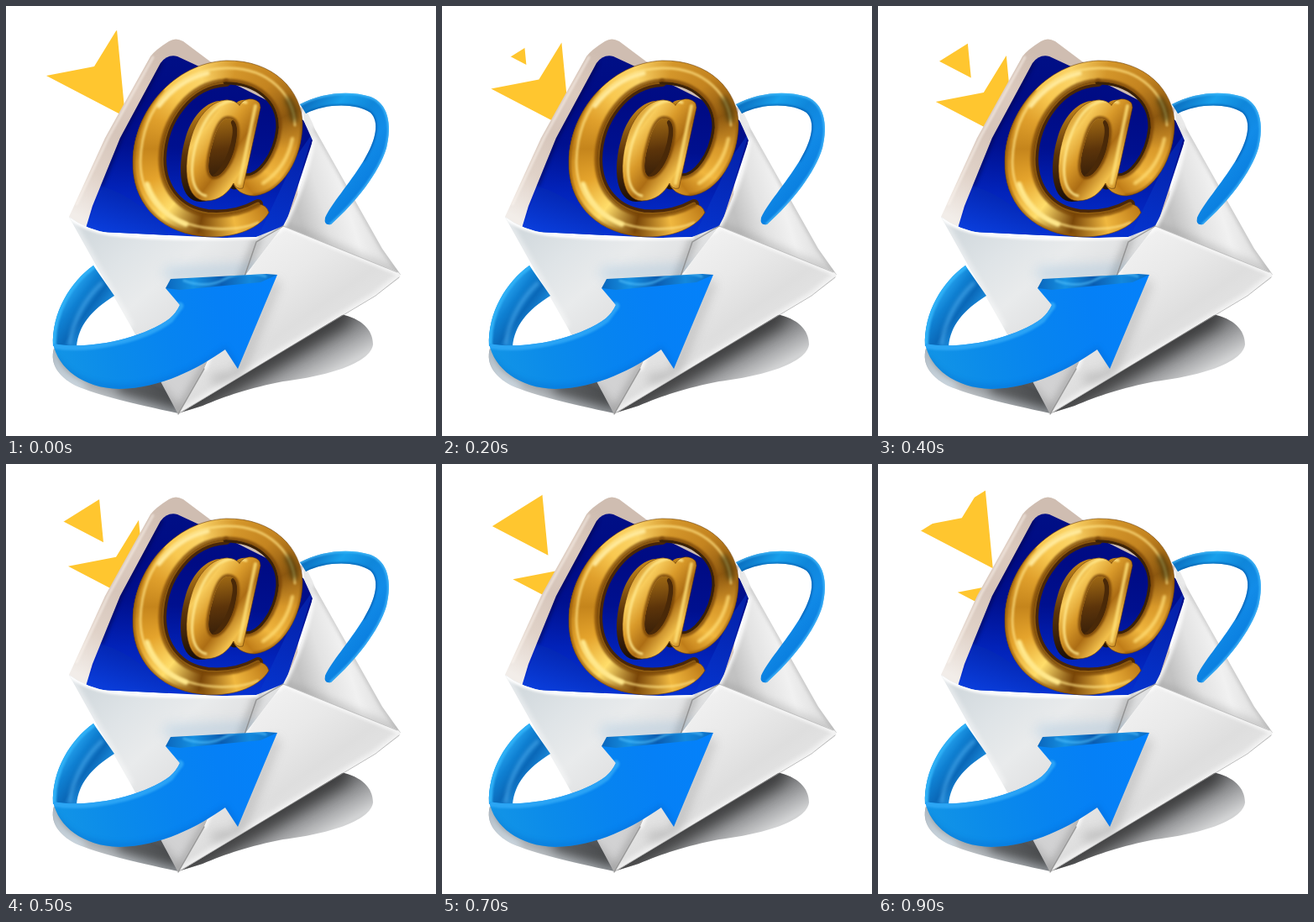
Recreate the animation shown at these times as an HTML page with a canvas. Size 512 px wide and 512 px high, loop 1 s.

```html
<!DOCTYPE html>
<html lang="en">
<head>
<meta charset="utf-8">
<title>Mail</title>
<style>
  html, body { margin: 0; width: 100%; height: 100%; overflow: hidden; background: #fff; }
  canvas { display: block; width: 512px; height: 512px; }
</style>
</head>
<body>
<canvas id="stage" width="512" height="512"></canvas>
<script>
const SIZE = 512, STEP = 100, STEPS = 10;
const ctx = document.getElementById('stage').getContext('2d');
const art = document.createElement('canvas');
art.width = art.height = SIZE;
const g = art.getContext('2d');

function addStops(grad, colors) {
  colors.forEach((c, i) => grad.addColorStop(i / (colors.length - 1), c));
  return grad;
}
const linear = (x0, y0, x1, y1, ...colors) => addStops(g.createLinearGradient(x0, y0, x1, y1), colors);
const conic = (x, y, ...colors) => addStops(g.createConicGradient(0, x, y), colors);

function fill(d, style) {
  g.fillStyle = style;
  g.fill(new Path2D(d), 'evenodd');
}

function line(d, style, width, blur = 0) {
  g.save();
  if (blur) g.filter = `blur(${blur}px)`;
  g.strokeStyle = style;
  g.lineWidth = width;
  g.lineCap = 'round';
  g.stroke(new Path2D(d));
  g.restore();
}

function inside(d, draw) {
  g.save();
  g.clip(new Path2D(d), 'evenodd');
  draw();
  g.restore();
}

function drawShadow() {
  const right = 'M205 485L234 476C262 464 290 455 330 447C380 441 434 426 437 403C437 386 424 372 398 367L300 400Z';
  fill(right, linear(322, 402, 352, 456, '#4a4a4c', '#77787a', '#a4a5a7', '#d2d3d4'));
  inside(right, () => line('M215 482L400 372', 'rgba(25,25,25,.6)', 20, 9));
  const left = 'M57 408C52 426 62 441 83 452C110 464 150 473 205 485L215 440L150 415Z';
  fill(left, linear(145, 440, 130, 474, '#55585b', '#8d9195', '#c3c8cc'));
  inside(left, () => {
    line('M57 405C55 432 72 445 88 453', 'rgba(205,220,232,.8)', 12, 5);
    line('M140 455L200 470', 'rgba(40,40,40,.5)', 14, 6);
  });
}

function drawFlap() {
  const flap = 'M75 251L118 157L172 60Q178 52 194 42Q202 37 211 42L243 66L330 104L353 122L345 262L100 271Z';
  fill(flap, linear(185, 55, 85, 250, '#cfbdb1', '#dccabe', '#d6c5ba', '#e0d2c8', '#f2ede9'));
  line('M84 236L122 156L175 61', 'rgba(255,250,244,.5)', 3, 1);
  const lining = 'M94 268L103 238L136 157L184 68Q192 57 204 60L232 73L318 116L354 136L366 158L332 262L298 278Z';
  fill(lining, linear(200, 60, 185, 275, '#000f86', '#000b84', '#00108f', '#0222b8', '#0634d4'));
  inside(lining, () => {
    fill('M94 268L114 215Q160 228 195 275Z', linear(130, 222, 115, 270, '#0428b6', '#0a3edc'));
    fill('M366 150L332 262L300 275L345 180Z', linear(355, 160, 315, 270, '#0420a8', '#0533cc'));
    line('M184 68L136 157L114 212', 'rgba(0,0,60,.5)', 5, 2);
  });
}

function drawPanels() {
  const side = 'M352 117Q362 130 368 147L448 289L470 320L330 262C346 233 359 195 365 160L356 140Z';
  fill(side, linear(342, 225, 425, 200, '#c2c2c2', '#e2e2e2', '#f1f1f1', '#dedede'));
  inside(side, () => {
    line('M331 262L470 320', 'rgba(135,135,135,.35)', 9, 5);
    line('M368 147L448 289L470 320', 'rgba(140,140,140,.4)', 4, 2);
    line('M330 262C346 233 359 195 365 160', '#fff', 5, 2);
  });

  const front = 'M75 251Q95 266 125 271Q190 279 298 275L330 262L284 322L236 432L205 486L148 380L108 310Z';
  fill(front, linear(110, 260, 240, 410, '#d3dade', '#dfe4e7', '#e9ebec', '#e0e1e2', '#d2d2d3'));
  inside(front, () => {
    line('M300 277L281 324L236 432L205 486', 'rgba(110,110,110,.4)', 9, 5);
    line('M75 251L108 310L148 380', 'rgba(255,255,255,.6)', 6, 3);
    line('M77 253Q95 266 125 271Q190 279 298 275', '#fff', 5, 1.5);
    line('M195 318L300 314', 'rgba(125,175,215,.3)', 14, 7);
    line('M165 445L200 480', 'rgba(90,90,90,.3)', 16, 6);
  });

  const corner = 'M330 262L465 316Q473 320 466 326L440 344L205 486L236 432L284 322Z';
  fill(corner, linear(285, 300, 370, 420, '#f0f0f0', '#e9e9e9', '#dedede', '#e6e6e6'));
  inside(corner, () => {
    line('M205 486L440 345L470 321', 'rgba(255,255,255,.75)', 7, 3);
    line('M332 263L467 318', '#fff', 4, 2);
    line('M330 264L300 284L284 322L236 432', 'rgba(255,255,255,.9)', 5, 2);
    line('M320 332L276 440L250 444', 'rgba(110,110,110,.25)', 12, 6);
  });
  line('M330 262L298 281L284 322M236 432L205 486', 'rgba(135,135,135,.8)', 1.4);
  line('M330 262L466 317', 'rgba(180,180,180,.8)', 1.2);
  line('M206 485L440 345L468 323', 'rgba(160,160,160,.7)', 1);
}

function drawAt() {
  const ring = 'M313 246C300 268 265 278 232 274C180 268 150 232 151 185C152 125 200 68 262 65' +
    'C318 64 352 100 353 140C353 180 330 222 296 226C282 226 273 219 270 210L281 202' +
    'C300 208 322 178 325 145C326 112 298 90 262 90C218 92 186 135 185 182' +
    'C185 220 208 244 240 248C262 250 282 246 300 236Q310 236 313 246Z';
  const rim = 'M300 236C282 246 262 250 240 248C208 244 185 220 185 182C186 135 218 92 262 90';
  const hook = 'M262 90C298 90 326 112 325 145C322 178 300 208 281 202';
  const bowl = 'M278 118C262 102 232 118 221 155C209 195 215 232 238 232C254 232 265 222 271 211' +
    'Q274 219 282 217L303 121Q303 113 294 111Q284 109 278 118Z';
  const hole = 'M264 134C276 134 278 148 272 170C266 192 254 205 246 203C238 199 241 180 247 160C251 146 257 134 264 134Z';

  line(rim, '#4a2708', 12);
  line(rim, '#8a570f', 5);
  line(hook, '#3b2106', 7);
  g.save();
  g.translate(-7, 1);
  fill(bowl, linear(215, 120, 230, 230, '#c4861a', '#5c340a', '#1d1008'));
  g.restore();

  fill(ring, conic(252, 170, '#d9992a', '#f0b63e', '#c07d18', '#f0b840', '#7a4709', '#ffdd6a', '#e5a42c',
    '#c5851c', '#e0a02c', '#f8c850', '#fbd468', '#d4962a', '#c48420', '#8d5810', '#d9992a'));
  inside(ring, () => {
    line('M300 258C265 274 160 270 160 185C162 115 208 75 262 74C315 73 343 108 344 142', 'rgba(255,226,130,.7)', 3, 1);
    line(rim, 'rgba(120,68,6,.75)', 7, 1);
    line(hook, 'rgba(120,68,8,.75)', 7, 1);
    line('M232 274C180 268 150 232 151 185C152 150 166 120 185 100', 'rgba(150,90,10,.7)', 6, 1);
    line('M353 140C353 180 330 222 296 226', 'rgba(140,82,8,.6)', 5, 1);
    line('M168 212C176 236 194 252 214 260', '#ffe88c', 6, 1.5);
    line('M182 119Q206 88 240 80', '#ffea9c', 5, 1.5);
    line('M336 112Q342 122 343 134', 'rgba(55,50,10,.7)', 8, 3);
    line('M341 158Q334 193 306 211', 'rgba(255,220,115,.8)', 4, 1.5);
  });
  line(ring, 'rgba(110,64,8,.6)', 1);

  fill(bowl + hole, linear(215, 140, 300, 205, '#c98a22', '#f8cc5c', '#d99a2a', '#ac6d14', '#f2c04c', '#c0801c'));
  inside(bowl + hole, () => {
    line('M286 115C257 105 237 128 226 165C217 199 222 222 238 226', 'rgba(255,232,140,.85)', 3, 1);
    line('M297 119L278 211', 'rgba(255,225,120,.8)', 4, 1);
    line(hole, 'rgba(110,60,4,.75)', 6, 1);
  });
  inside(hole, () => line('M272 139C279 153 264 196 248 205', '#4a2908', 8));
  line(bowl, 'rgba(100,56,6,.6)', 1);
}

function drawSwoosh() {
  const tail = 'M350 117C376 103 409 100 434 108C455 116 460 141 453 169C444 199 417 233 387 260' +
    'Q378 262 380 252C387 236 408 213 426 184C441 159 445 138 434 127C416 115 380 116 357 128Z';
  fill(tail, linear(352, 120, 440, 200, '#0a6fc0', '#19a0ec', '#0f86da', '#128ce8', '#0a7fe0'));
  inside(tail, () => {
    line('M357 128C380 116 416 115 434 127C445 138 441 159 426 184', 'rgba(0,75,155,.6)', 3, 1);
    line('M350 117C376 103 409 100 434 108C455 116 460 141 453 169C444 199 417 233 387 260', 'rgba(80,195,255,.7)', 4, 1);
  });

  const back = 'M104 309C77 328 54 365 56 405L84 406C86 380 102 362 129 345Z';
  fill(back, linear(65, 350, 105, 380, '#28a6f2', '#0f80d2', '#0a68b8', '#1c8cdc'));
  inside(back, () => {
    line('M104 309C77 328 54 365 56 405', '#2fb0f6', 8, 1);
    line('M114 330C96 347 80 372 76 402', 'rgba(90,185,248,.6)', 4, 2);
  });

  const band = 'M56 402C95 410 161 397 195 372Q203 365 207 356L190 336L323 320L276 432L261 409' +
    'C228 432 185 455 135 456C91 455 62 431 56 402Z';
  fill(band, linear(60, 420, 320, 350, '#1294e6', '#0b8bea', '#0784f0', '#0580f6', '#0481fa'));
  inside(band, () => {
    line('M60 420C78 449 120 458 160 453C200 447 232 429 261 409L276 432', 'rgba(0,90,190,.35)', 5, 3);
    line('M56 403C95 411 161 398 195 373L207 357', 'rgba(50,170,248,.8)', 9, 1);
  });

  const top = 'M190 336L196 325L310 319L323 320L303 329L207 338Z';
  fill(top, linear(190, 330, 323, 325, '#0a66bc', '#1690e2', '#0a5cb0', '#1488dc', '#0a6cc4'));
  inside(top, () => line('M212 327Q239 337 261 325T309 322', 'rgba(80,190,250,.6)', 3, 1));
}

// One arrowhead, sliding along its own axis and masked by a slanted line.
const HEAD = [[48, 83], [105, 72], [132, 28], [142, 132]];
const SLIDE = [5.2, 7.75];

function drawHead(k) {
  ctx.beginPath();
  HEAD.forEach(([x, y]) => ctx.lineTo(x + k * SLIDE[0], y + k * SLIDE[1]));
  ctx.closePath();
  ctx.fill();
}

function render(now) {
  const k = Math.floor(now / STEP) % STEPS;
  ctx.fillStyle = '#fff';
  ctx.fillRect(0, 0, SIZE, SIZE);
  ctx.save();
  ctx.beginPath();
  ctx.moveTo(0, 111.5);
  ctx.lineTo(178.4, 0);
  ctx.lineTo(SIZE, 0);
  ctx.lineTo(SIZE, SIZE);
  ctx.lineTo(0, SIZE);
  ctx.clip();
  ctx.fillStyle = '#ffc62f';
  drawHead(k);
  drawHead(k - STEPS);
  ctx.restore();
  ctx.drawImage(art, 0, 0);
}

function loop() {
  render(performance.now());
  requestAnimationFrame(loop);
}

drawShadow();
drawFlap();
drawAt();
drawPanels();
drawSwoosh();
loop();
</script>
</body>
</html>
```
